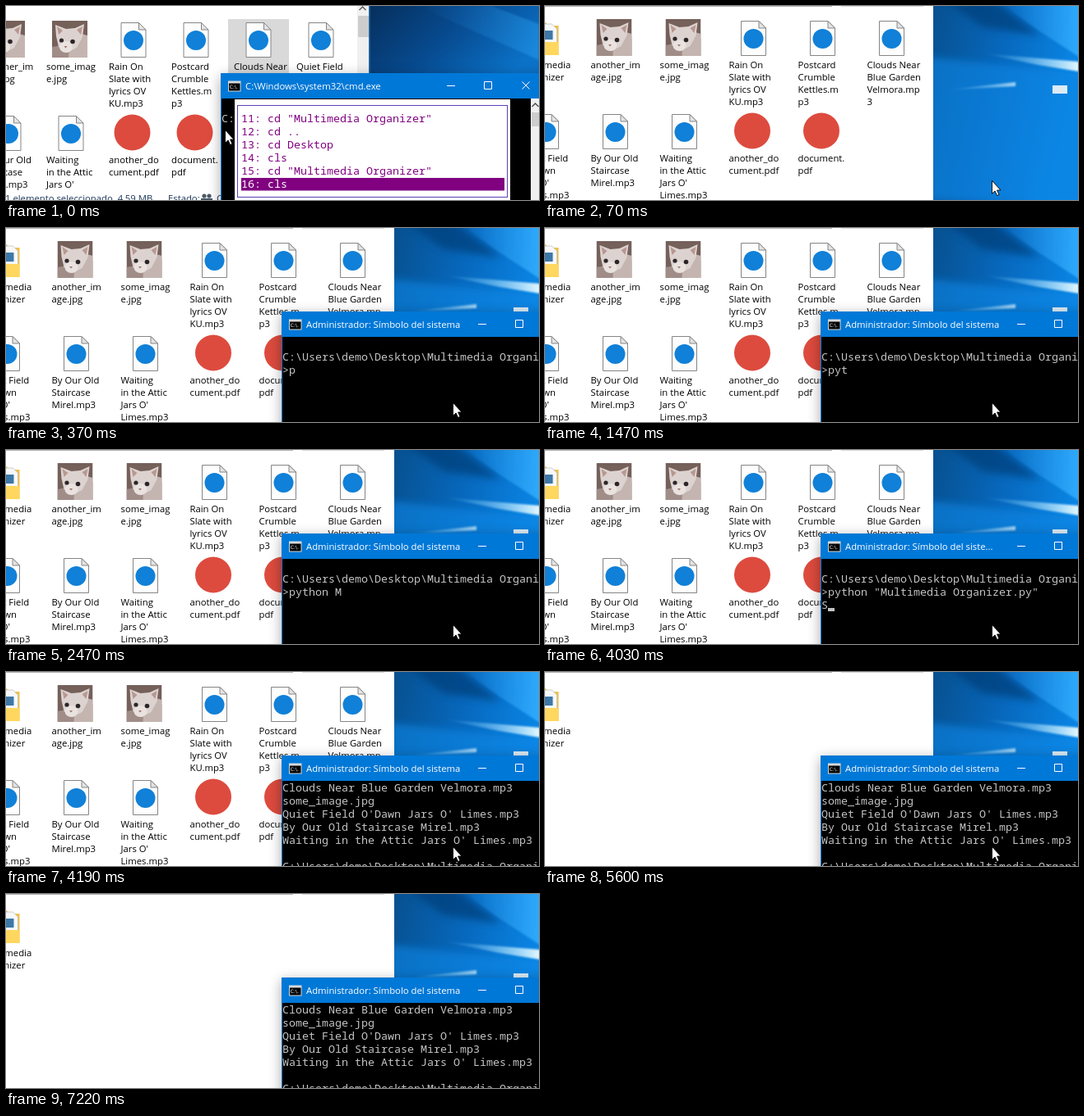
These frames come from a looping animation (648x237 px, 7700 ms). An HTML page:

```html
<!DOCTYPE html>
<html lang="es">
<head>
<meta charset="utf-8">
<title>Multimedia Organizer</title>
<style>
  html, body { margin: 0; width: 100%; height: 100%; overflow: hidden; background: #fff; }
  svg { display: block; }
  text { white-space: pre; }
  .ui { font: 11.3px "Open Sans", sans-serif; }
  .mono { font: 13.333px "Noto Sans Mono", monospace; fill: #c4c4c4; }
</style>
</head>
<body>
<svg id="stage" width="648" height="237" viewBox="0 0 648 237">
  <defs>
    <linearGradient id="sky" x1="0" y1="0" x2="1" y2=".3">
      <stop offset="0" stop-color="#07508f"/>
      <stop offset=".5" stop-color="#0768bd"/>
      <stop offset="1" stop-color="#0a86e6"/>
    </linearGradient>
    <linearGradient id="dusk" x1="0" y1="0" x2="1" y2=".5">
      <stop offset="0" stop-color="#062f5c"/>
      <stop offset=".5" stop-color="#074a8f"/>
      <stop offset="1" stop-color="#0b72c8"/>
    </linearGradient>
    <linearGradient id="ray">
      <stop offset="0" stop-color="#2a9df4" stop-opacity="0"/>
      <stop offset="1" stop-color="#35b0ff" stop-opacity=".9"/>
    </linearGradient>
    <linearGradient id="beam">
      <stop offset="0" stop-color="#5cc4ff" stop-opacity="0"/>
      <stop offset="1" stop-color="#e4f8ff"/>
    </linearGradient>
    <filter id="blur" x="-20%" y="-20%" width="140%" height="140%"><feGaussianBlur stdDeviation="1.2"/></filter>
    <filter id="soft" x="-30%" y="-30%" width="160%" height="160%"><feGaussianBlur stdDeviation="5"/></filter>
    <filter id="shade" x="-20%" y="-30%" width="140%" height="160%"><feGaussianBlur stdDeviation="8"/></filter>
    <clipPath id="thumb"><rect width="43" height="45"/></clipPath>
    <path id="mouse" d="M.5.5V16.3L4.1 13 6.6 18.6 9 17.5 6.6 12H11Z" fill="#fff" stroke="#000" stroke-width=".9"/>
    <g id="song">
      <path d="M.5.5H22L30.5 9V42.5H.5Z" fill="#fdfdfd" stroke="#858585"/>
      <path d="M22 .5V9H30.5Z" fill="#e4e4e4" stroke="#858585"/>
      <circle cx="15.5" cy="22" r="12" fill="#1080d8"/>
    </g>
    <circle id="pdf" cx="21.5" cy="22.5" r="22" fill="#dd4b3e"/>
    <g id="photo" clip-path="url(#thumb)">
      <rect width="43" height="45" fill="#75605a"/>
      <path d="M0 32 43 24V45H0Z" fill="#a08d88"/>
      <path d="M22 12 43 18V45H20Z" fill="#c4b5b1"/>
      <path d="M4 5 17 10 28 9 39 4 37 20 30 33 18 39 8 32 5 19Z" fill="#dcd3d0"/>
      <path d="M6 7 13 12 8 17ZM37 7 30 11 35 17Z" fill="#b99791"/>
      <ellipse cx="17" cy="32" rx="8" ry="7" fill="#e9e2df"/>
      <circle cx="11.5" cy="24" r="2.6" fill="#2b2628"/>
      <circle cx="25" cy="25.5" r="2.8" fill="#2b2628"/>
      <path d="M14.5 31H18.5L16.5 33.5Z" fill="#a3736e"/>
    </g>
    <g id="folder">
      <path d="M4 4H22L26 8H38V44H4Z" fill="#f0c04a"/>
      <path d="M16 6H30L36 12V34H16Z" fill="#f8f8f8" stroke="#b8b8b8" stroke-width=".7"/>
      <rect x="20" y="14" width="11" height="11" fill="#3d78a8"/>
      <path d="M4 28H38V44H4Z" fill="#ffd75e"/>
    </g>
    <g id="shell">
      <rect width="15.5" height="13" fill="#d8d8d8"/>
      <rect x="1" y="3" width="13.5" height="9" fill="#000"/>
      <text x="1.8" y="9.6" font-family="DejaVu Sans, sans-serif" font-size="6" fill="#fff">C:\.</text>
    </g>
  </defs>
</svg>
<script>
const LOOP = 7700;
const files = [
  ['folder', 'Multimedia/Organizer'],
  ['photo', 'another_im/age.jpg'],
  ['photo', 'some_imag/e.jpg'],
  ['song', 'Rain On/Slate with/lyrics OV/KU.mp3'],
  ['song', 'Postcard/Crumble/Kettles.m/p3'],
  ['song', 'Clouds Near/Blue Garden/Velmora.mp/3'],
  ['song', "Quiet Field/O'Dawn/Jars O'/Limes.mp3"],
  ['song', 'By Our Old/Staircase/Mirel.mp3'],
  ['song', "Waiting/in the Attic/Jars O'/Limes.mp3"],
  ['pdf', 'another_do/cument.pdf'],
  ['pdf', 'document./pdf']
];

const rect = (x, y, w, h, fill, more = '') =>
  `<rect x="${x}" y="${y}" width="${w}" height="${h}" fill="${fill}" ${more}/>`;
const text = (x, y, s, cls, more = '') => `<text x="${x}" y="${y}" class="${cls}" ${more}>${s}</text>`;
const use = (id, x, y) => `<use href="#${id}" x="${x}" y="${y}"/>`;

function file([icon, label], x, y) {
  const song = icon === 'song';
  const lines = label.split('/').map((s, i) => text(x + 1, y + 60 + i * 15, s, 'ui'));
  return use(icon, x + (song ? 15.5 : 8), y + (song ? 2 : 0)) + lines.join('');
}

// Lays out files from index a to b, starting at x.
const row = (a, b, x, y, pitch) =>
  files.slice(a, b).map((f, i) => file(f, x + i * pitch, y)).join('');

function consoleWindow(x, y, title, minX, id) {
  const w = 648 - x, h = 237 - y;
  return rect(x, y + 4, w + 20, h + 20, '#000', 'filter="url(#shade)" opacity=".35"') +
    rect(x, y, w, h, '#0078d7') + rect(x + 1, y + 31, w, h, '#000') +
    use('shell', x + 9, y + 9.5) +
    text(x + 30, y + 20, title, 'ui', `fill="#fff" id="${id}"`) +
    `<path d="M${minX} ${y + 15.5}h10M${minX + 45.5} ${y + 10.5}h9v9h-9z" fill="none" stroke="#fff"/>`;
}

function historyScene() {
  const items = ['cd "Multimedia Organizer"', 'cd ..', 'cd Desktop', 'cls', 'cd "Multimedia Organizer"', 'cls'];
  return rect(0, 0, 648, 237, '#fff') +
    rect(442, 0, 206, 100, 'url(#dusk)') +
    '<path d="M500 0 648 66V22L590 0Z" fill="url(#ray)" opacity=".4" filter="url(#blur)"/>' +
    rect(427, 0, 14, 237, '#f0f0f0') + rect(428, 12, 13, 26, '#cdcdcd') +
    '<path d="M429.5 5 433.5 1 437.5 5" fill="none" stroke="#606060" stroke-width="1.5"/>' +
    rect(441, 0, 1.5, 82, '#2b6ca8') +
    rect(270, 16, 74, 70, '#d9d9d9') +
    row(1, 7, -28, 18, 76) + row(7, 11, -28, 132, 76) +
    rect(0, 226, 262, 11, '#fff') +
    text(-1, 238.5, '1 elemento seleccionado  4,59 MB', 'ui', 'fill="#1e395b"') +
    text(197, 238.5, 'Estado:', 'ui', 'fill="#1e395b"') +
    '<circle cx="241" cy="232" r="2.6" fill="#4b5a68"/><circle cx="247" cy="232" r="2.6" fill="#4b5a68"/>' +
    rect(237, 235, 14, 2, '#4b5a68') + text(256, 238.5, 'C', 'ui', 'fill="#1e395b"') +
    consoleWindow(261, 82, 'C:\\Windows\\system32\\cmd.exe', 536, 'oldTitle') +
    '<path d="M627.5 92.5l9 9m0-9l-9 9" stroke="#fff"/>' +
    rect(638, 113, 10, 124, '#f0f0f0') + rect(639, 130, 9, 17, '#cdcdcd') +
    '<path d="M639.5 123 643.5 119 647.5 123" fill="none" stroke="#505050" stroke-width="1.5"/>' +
    text(262, 142, 'C:', 'mono') +
    rect(278, 114, 335, 123, '#fff') +
    rect(281.5, 121.5, 328, 112, 'none', 'stroke="#5b3fb5"') +
    rect(286, 210, 320, 15.5, '#800080') +
    items.map((s, i) => text(286, 142 + i * 16, `${11 + i}: ${s}`, 'mono', `style="fill:${i < 5 ? '#800080' : '#fff'}"`)).join('') +
    use('mouse', 266, 151);
}

function wallpaper() {
  return rect(472, 0, 176, 237, 'url(#sky)') +
    `<svg x="472" width="176" height="237">
      <path d="M10 -10H70L130 36 60 26Z" fill="#063f7c" opacity=".75" filter="url(#soft)"/>
      <path d="M84 -2H180V64L128 30Z" fill="url(#ray)" filter="url(#blur)"/>
      <path d="M-5 62 180 84V237H-5Z" fill="#0f86e4" opacity=".6" filter="url(#soft)"/>
      <path d="M60 58 177 68V80L128 72Z" fill="url(#beam)" filter="url(#blur)"/>
      <path d="M10 103 100 93V98Z" fill="url(#beam)" opacity=".7" filter="url(#blur)"/>
    </svg>` +
    rect(617, 97, 18, 10, '#dcebf4');
}

function desktopScene() {
  return rect(0, 0, 648, 237, '#fff') +
    rect(0, 0, 349, 1, '#b4b4b4') + rect(360, 0, 100, 1, '#d9d9d9') +
    wallpaper() +
    row(0, 1, -29.5, 16, 84) +
    `<g id="files">${row(1, 6, 54.5, 16, 84)}${row(6, 11, -29.5, 130, 84)}</g>` +
    '<g id="cmd">' +
    consoleWindow(335, 102, '', 574, 'title') +
    [...Array(7)].map((_, i) => text(336, 146 + i * 16, '', 'mono line')).join('') +
    '<rect id="caret" width="8" height="4" fill="#c4c4c4"/></g>' +
    `<g id="pointer">${use('mouse', 543, 213)}</g>`;
}

const el = id => document.getElementById(id);
el('stage').insertAdjacentHTML('beforeend',
  `<g id="desktop">${desktopScene()}</g><g id="history">${historyScene()}</g>`);

const lines = [...document.querySelectorAll('.line')];
const path = 'C:\\Users\\demo\\Desktop\\Multimedia Organi';
const command = 'python "Multimedia Organizer.py"';
const listing = [
  'Clouds Near Blue Garden Velmora.mp3', 'some_image.jpg', "Quiet Field O'Dawn Jars O' Limes.mp3",
  'By Our Old Staircase Mirel.mp3', "Waiting in the Attic Jars O' Limes.mp3"
];

// Start time, typed text, caret visible
const typing = [
  [0, 'p', 0], [920, 'p', 1], [1220, 'py', 1], [1300, 'pyt', 1], [1470, 'pyt', 0],
  [1640, 'pyth', 1], [1770, 'pytho', 1], [1920, 'python', 0], [2090, 'python ', 1],
  [2470, 'python M', 0], [2800, 'python Mu', 1], [3020, 'python Mul', 1], [3250, command, 1]
];

function screen(t) {
  if (t >= 4110) return { rows: t < 4190 ? listing : [...listing, '', path] };
  if (t >= 3730) {
    const out = t < 4030 ? '' : 'S';
    return { rows: ['', path, '>' + command, out], caret: [out.length, 3] };
  }
  const [, typed, on] = typing.filter(s => s[0] <= t).pop();
  return { rows: ['', path, '>' + typed], caret: on ? [typed.length + 1, 2] : null };
}

const show = (id, on) => { el(id).style.display = on ? '' : 'none'; };

function draw(t) {
  show('history', t < 70);
  show('desktop', t >= 70);
  show('cmd', t >= 370);
  show('files', t < 5600);
  show('pointer', t < 7220);
  const drop = t < 7070 ? 0 : t < 7145 ? 5 : 14;
  el('pointer').setAttribute('transform', `translate(0 ${drop})`);

  const busy = t >= 3730 && t < 4190;
  el('title').textContent = 'Administrador: Símbolo del ' + (busy ? 'siste...' : 'sistema');
  const { rows, caret } = screen(t);
  lines.forEach((line, i) => { line.textContent = rows[i] || ''; });
  show('caret', caret);
  if (caret) {
    el('caret').setAttribute('x', 336 + caret[0] * 8);
    el('caret').setAttribute('y', 145 + caret[1] * 16);
  }
}

const start = performance.now();
function tick() {
  draw((performance.now() - start) % LOOP);
  requestAnimationFrame(tick);
}
tick();
</script>
</body>
</html>
```
